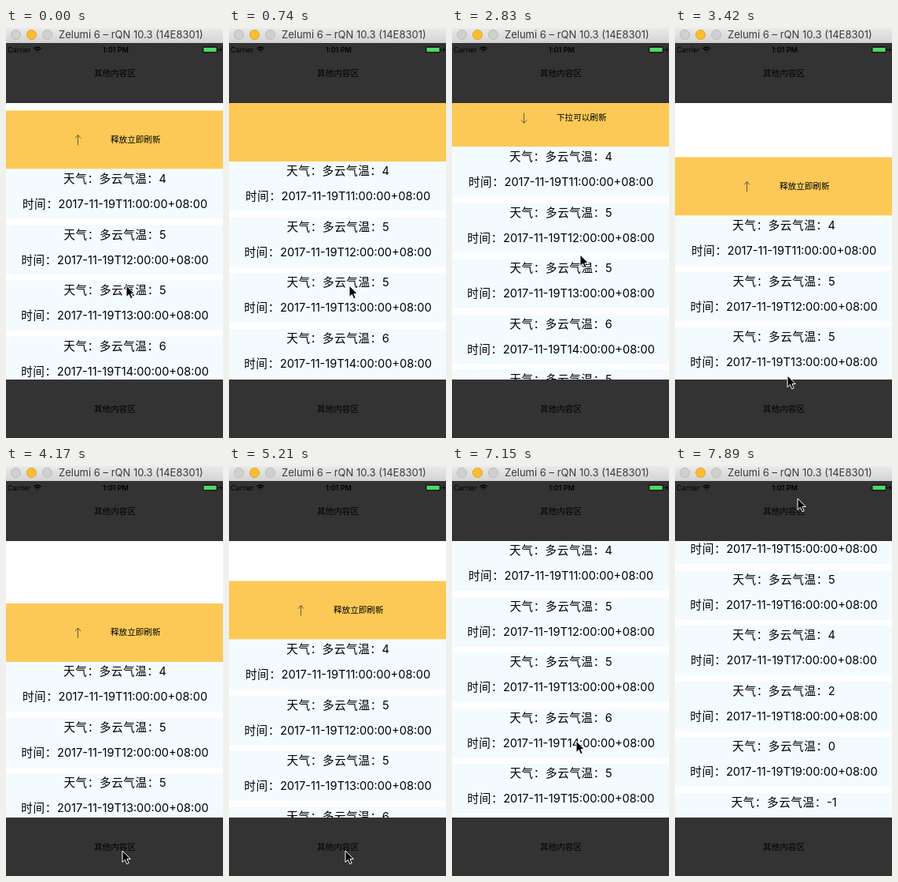
An HTML page for the animation above (8000 ms loop, 276x519 px).

```html
<!DOCTYPE html>
<html lang="zh-CN">
<head>
<meta charset="utf-8">
<style>
  html, body { margin: 0; width: 100%; height: 100%; overflow: hidden; }
  body { position: relative; background: #333; color: #000; font-family: Inter, "Noto Sans CJK SC", "Noto Sans CJK", sans-serif; }
  body *, svg { position: absolute; white-space: nowrap; }
  .bar { left: 0; top: 0; width: 276px; height: 18.5px; background: linear-gradient(#eaeaea, #d3d3d3); }
  .bar i { top: 2px; width: 11px; height: 11px; border-radius: 50%; background: #d0d0d0; border: .5px solid #b9b9b9; }
  .bar i.on { background: #fdbe2d; border-color: #dfa023; }
  .title { left: 67px; top: 0; font-size: 13px; line-height: 17px; color: #3a3a3a; }
  .status { top: 22px; font-size: 9px; line-height: 11px; }
  .area { left: 0; width: 277px; text-align: center; font-size: 10.6px; line-height: 16px; }
  #view { left: 0; top: 95px; width: 276px; height: 350px; overflow: hidden; background: #fff; }
  #list { left: 0; top: 0; width: 276px; }
  .head { left: 0; top: -74.5px; width: 276px; height: 74.5px; background: #fcc957; }
  #hint { left: 133px; top: 29.5px; font-size: 10.6px; line-height: 16px; }
  #arrow { left: 87px; top: 30px; }
  .row { left: 0; width: 276px; height: 63px; background: #f3fbff; }
  .row p { left: 0; width: 277px; margin: 0; text-align: center; font-size: 14.6px; line-height: 25px; }
  .row span { position: static; letter-spacing: .6px; }
  #cursor { left: 0; top: 0; }
</style>
</head>
<body>
<div class="bar">
  <i style="left:6px"></i><i class="on" style="left:26px"></i><i style="left:46px"></i>
  <div class="title">Zelumi 6 – rQN 10.3 (14E8301)</div>
</div>
<div class="status" style="left:2px">Carrier</div>
<div class="status" style="left:123px;font-weight:600">1:01 PM</div>
<svg width="276" height="40" style="left:0;top:0" fill="none" stroke="#000" stroke-width="1.3">
  <path d="M35.5 26.2Q40 22.3 44.5 26.2M37.2 28.2Q40 25.8 42.8 28.2"/>
  <path d="M38.6 29.5h2.8L40 31z" fill="#000" stroke="none"/>
  <rect x="250.5" y="24" width="18" height="7" rx="1.5" stroke-width=".7"/>
  <rect x="251.5" y="25" width="16" height="5" rx=".6" fill="#4cd964" stroke="none"/>
  <path d="M270 26.3v2.4" stroke-width="1"/>
  <path d="M274 24l-2.5 4h1.6l-.6 3 2.7-4h-1.7z" fill="#000" stroke="none"/>
</svg>
<div class="area" style="top:49.5px">其他内容区</div>
<div class="area" style="top:475px">其他内容区</div>
<div id="view">
  <div id="list">
    <div class="head">
      <svg id="arrow" width="9" height="15" fill="none" stroke="#6b5a35" stroke-width="1"><path d="M4.5 14V1M1 5L4.5 1L8 5"/></svg>
      <div id="hint"></div>
    </div>
  </div>
</div>
<svg id="cursor" width="16" height="22"><path d="M1 1V15.5L4.4 12.4L6.7 17.8L9.2 16.7L6.9 11.5H11.3Z" fill="#000" stroke="#fff"/></svg>
<script>
const LOOP = 8000, STEP = 149, LEAD = 8, HEADER = 74;
const $ = id => document.getElementById(id);

[4, 5, 5, 6, 5, 5, 4, 2, 0, -1].forEach((temp, i) => {
  $('list').insertAdjacentHTML('beforeend', `<div class="row" style="top:${i * 70.5}px">
    <p style="top:0"><span>天气：多云气温：</span>${temp}</p>
    <p style="top:32px"><span>时间：</span>2017-11-19T${11 + i}:00:00+08:00</p></div>`);
});

const pullKeys = [[0, 83.5], [1, 83.5], [5, HEADER, 2], [11, HEADER], [16, 0, 2.1], [17, 0],
  [19, 55.5], [23, 142.5, 1.3], [26, 153, 1.5], [34, 153], [39, HEADER, 2],
  [42, HEADER], [47, 0, 2.1], [50, 0], [53, -316]];
const cursorX = [[0, 152], [7, 152], [9, 154], [14, 154], [17, 165], [19, 162], [23, 142],
  [26, 146], [28, 147], [43, 147], [48, 157], [50, 157], [53, 155]];
const cursorY = [[0, 325], [7, 325], [9, 297], [14, 297], [17, 190], [19, 286], [23, 439],
  [26, 480], [28, 486], [43, 486], [48, 347], [50, 357], [53, 40]];

function track(keys, k) {
  const i = keys.findIndex(key => key[0] >= k);
  if (i < 1) return keys[0][1];
  const [k0, from] = keys[i - 1], [k1, to, power = 1] = keys[i];
  return to + (from - to) * (1 - (k - k0) / (k1 - k0)) ** power;
}

function draw() {
  const k = Math.floor((performance.now() % LOOP + LEAD) / STEP);
  const pull = track(pullKeys, k), ready = pull > HEADER;
  const refreshing = k >= 5 && k < 17 || k >= 39;
  $('list').style.transform = `translateY(${pull}px)`;
  $('hint').textContent = ready ? '释放立即刷新' : '下拉可以刷新';
  $('arrow').style.transform = ready ? '' : 'rotate(180deg)';
  $('hint').style.opacity = $('arrow').style.opacity = refreshing ? 0 : 1;
  $('cursor').style.transform = `translate(${track(cursorX, k)}px, ${track(cursorY, k)}px)`;
  requestAnimationFrame(draw);
}
draw();
</script>
</body>
</html>
```
